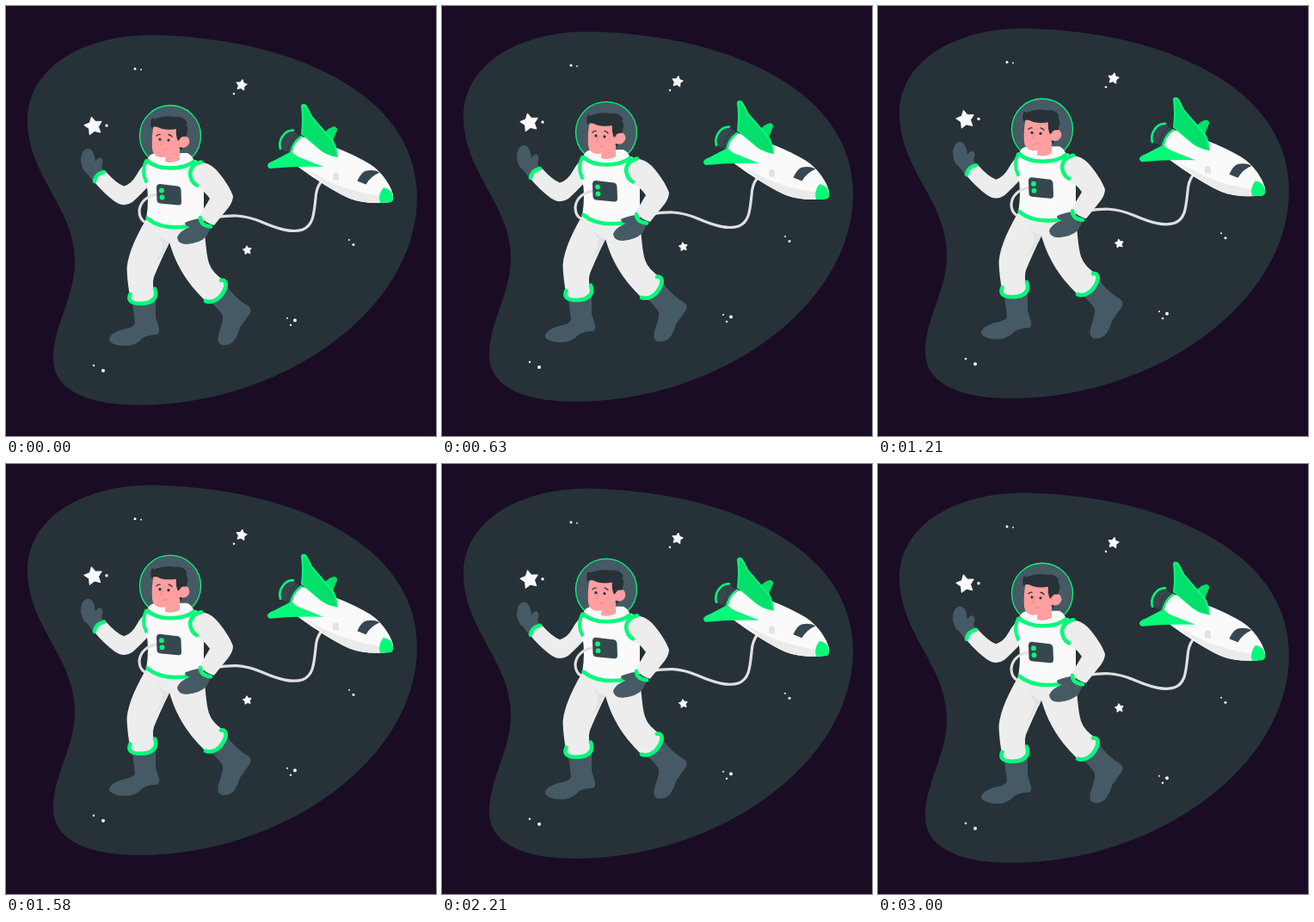
Animation, 500 px wide and 500 px high, one loop 3.04 s. Source, as an HTML page:

```html
<!DOCTYPE html>
<html lang="en">
<head>
<meta charset="utf-8">
<title>Floating astronaut</title>
<style>
html, body { margin: 0; width: 100%; height: 100%; overflow: hidden; background: #1a0c24; }
svg { display: block; width: 100%; height: 100%; }
.white { fill: #fafafa; }
.pale { fill: #ededed; }
.shade { fill: #e3e3e3; }
.slate { fill: #455a64; }
.dark { fill: #37474f; }
.green { fill: #07f97a; }
.leaf { fill: #04df6c; }
.skin { fill: #ff9fa0; }
.hair { fill: #263238; }
.ring { fill: none; stroke: #07f97a; stroke-width: 4.6; stroke-linecap: round; }
.hose { fill: none; stroke: #e0e0e0; stroke-width: 3.2; stroke-linecap: round; }
.line { fill: none; stroke: #263238; stroke-width: 1.3; stroke-linecap: round; }
</style>
</head>
<body>
<svg viewBox="0 0 500 500">
<g id="scene">
  <path class="hair" d="M180 34C90 31 25 72 25 133C25 197 80 235 80 296C80 340 55 370 55 410C55 448 98 464 155 464C320 464 478 354 478 222C478 100 330 39 180 34Z"/>
  <g id="sky" fill="#fafafa"></g>

  <!-- tether -->
  <path class="hose" d="M242 246C262 243 275 242 297 251C318 260 333 264 345 260C358 255 358 240 360 224C361 208 367 199 380 198"/>

  <!-- shuttle -->
  <path class="leaf" d="M370 148Q375 141 382 140Q387 142 384 147L378 162Z"/>
  <path class="dark" d="M333 144L343 152L333 172L319 166Q319 149 333 144Z"/>
  <path d="M339 148Q329 156 327 169" fill="none" stroke="#263238" stroke-width=".7"/>
  <path class="ring" style="stroke-width:2.6" d="M334 144.500C324 144 316 156 319 166"/>
  <path class="white" d="M344 152C365 157 398 169 420 182C435 190 447 207 450 219Q451 227 446 228C430 230 413 229 400 224C379 215 350 195 333 182Q330 161 344 152Z"/>
  <path fill="#ebebeb" d="M350 190C372 203 400 217 438 221L447 228C430 230 413 229 400 224C384 217 365 204 350 190Z"/>
  <path class="ring" style="stroke-width:2.6" d="M343 152Q332 160 331 173"/>
  <path class="green" d="M439 211Q449 213 450 222Q451 228 446 228.500L435 229Q432 219 439 211Z"/>
  <path class="dark" d="M408.500 203.500Q413 193 419 191.500Q428 190 434.500 193.500Q424 198 418.500 207.500Z"/>
  <path class="shade" d="M380 202V197Q380 193.500 383.500 193.500Q387 194 387 198V203Z"/>
  <path class="green" d="M343 116Q345 112 349 115Q352 119 356 128L381 157Q385 163 386 176Q371 174 361 164L343 149Q345 132 343 116Z"/>
  <path class="leaf" d="M345 115Q350 118 354 128L380 159L385 175Q371 173 361 163L344.500 148.500Q347 132 345 115Z"/>
  <path class="green" d="M304 185Q305 182 311 180L332 169Q337 175 344 177L369 187Q336 186 307 189Q304 188 304 185Z"/>

  <!-- boots and legs -->
  <path class="slate" d="M147 345L150 369Q149 374 136 376Q119 381 120 389Q125 396 143 395Q153 393 159 386Q166 382 176 382Q179 380 178 375L174 362V340Z"/>
  <path class="slate" d="M237 343Q249 354 252 360Q253 365 248 379Q244 391 250 394Q260 396 266 388Q270 382 272 374L284 357Q286 352 282 349Q266 340 254 322Z"/>
  <path class="pale" d="M189 256L190 275C197 298 207 319 233 344Q251 341 255 320Q240 311 236 299C232 286 232 266 229 247Z"/>
  <path class="pale" d="M164 246C154 263 142 286 140.500 305Q141 323 145 342Q163 351 174 335Q169 325 172 315Q179 298 190 275L202 257Z"/>
  <path class="shade" d="M176 265Q182 272 190 275Q186 286 171 302Q181 288 182 277Z"/>
  <path class="ring" d="M144.500 335Q140 345 154 346Q171 346.500 174 337Q174.500 332 173 329"/>
  <path class="ring" d="M232 343Q240 346 249 338Q258 327 255 321Q253 318 250 319"/>

  <!-- raised arm -->
  <path class="slate" d="M102 206Q96 195 91 192Q84 181 89 170Q93 164 99 167Q103 171 104 181Q107 175 111 177Q114 180 111 187Q112 190 116 194Z"/>
  <path class="pale" d="M166 180Q158 185 152 196Q146 207 137 209.500Q128 206 116 192.500Q106 196 103 205Q114 218 126 227Q137 235 147 228Q156 220 167 208Z"/>
  <path class="ring" d="M103 204Q104 195 114 193"/>

  <!-- torso -->
  <path class="white" d="M164 179Q190 185 221 179Q229 191 230 206L230 249Q215 263 193 260Q174 258 163 248Q167 224 163 205Z"/>
  <path class="hose" d="M177 219C164 220 156 228 155 238C155 246 158 249 161 251"/>
  <path class="ring" d="M164.500 247Q181 261 213 256"/>
  <path class="ring" style="stroke-width:4" d="M163 180Q157 192 163 204"/>
  <path class="dark" d="M179 207L200 209.500Q203 210 203.500 214L204 228Q204 232 200 231.500L179 229.500Q176 229 175.500 226L175 211Q175 207 179 207Z"/>
  <circle class="green" cx="181" cy="214.500" r="2.900"/>
  <circle class="green" cx="181.500" cy="222.500" r="2.900"/>

  <!-- lowered arm -->
  <path class="slate" d="M225 247Q214 249 208 252Q208 256 214 257Q202 261 199 269Q200 277 210 277Q225 276 233 268L238 258Z"/>
  <path class="pale" d="M221 182Q234 180 244 190C253 200 261 212 264 221Q264 227 259 234L242 255Q231 252 225 244L237 224Q231 215 220 209Q210 195 221 182Z"/>
  <path class="ring" d="M227 181.500Q215 184 214 195Q215 205 222 208.500"/>
  <path class="ring" d="M226 246Q226 255 238 256.500"/>

  <!-- helmet and head -->
  <circle class="slate" cx="191" cy="151" r="35.500"/>
  <path class="white" d="M165 177Q167 172 174 171L211 171Q217 174 218 179Q204 190 184 187Q170 185 165 177Z"/>
  <path class="skin" d="M186 170L185 181Q193 184 202 179V164Z"/>
  <path class="hair" d="M194 135H209L210 152L204 168L197 160Z"/>
  <path class="skin" d="M172 138Q169 150 170 166Q171 175 180 176Q195 176 202 164Q211 167 213.500 158Q213 150 205 151Q201 153 200 157Q197 151 198 141Z"/>
  <path class="hair" d="M169 142Q167 135 170 130Q172 133 174 131Q185 127 197 129Q204 128 209 133L211 136L209 137Q212 141 211 146L209 152Q203 151 201 157Q198 152 198 143Q184 145 177 141Q172 139 169 142Z"/>
  <circle class="hair" cx="179" cy="155" r="1.600"/>
  <circle class="hair" cx="189" cy="156" r="1.600"/>
  <path class="line" d="M175 151Q177 149 179 149.500M189 149.500Q192 150 193 152"/>
  <path d="M182 156L180 161.500L182 162M183 168Q185 166 187 167" fill="none" stroke="#ee7f86" stroke-width=".9" stroke-linecap="round"/>
  <circle cx="191" cy="151" r="35.500" fill="none" stroke="#07f97a" stroke-width="1.300"/>
  <path class="white" d="M165 177Q168 173 173 173Q177 181 187 182Q197 184 205 179L209 173Q216 174 218 179Q206 190 186 187Q171 185 165 177Z"/>
  <path class="ring" d="M164.500 180Q174 188.500 191 188.500Q209 188.500 218 181"/>
</g>
</svg>
<script>
const LOOP = 3040, RISE = 9.7;
const scene = document.getElementById('scene');

function starPath(x, y, r, tilt) {
  const points = Array.from({ length: 10 }, (_, i) => {
    const a = (i * 36 - 90 + tilt) * Math.PI / 180;
    const d = i % 2 ? r * 0.53 : r;
    return `${x + d * Math.cos(a)},${y + d * Math.sin(a)}`;
  });
  return `<polygon points="${points.join(' ')}" stroke="#fafafa" stroke-linejoin="round"/>`;
}

const stars = [[101.7, 139.7, 11, -12], [273.8, 92, 6.6, 10], [280.5, 284, 5.2, -8]];
const dots = [
  [117, 139, 1.7], [150, 73, 1.5], [157, 74, 0.9], [265, 102, 1.2],
  [399, 272, 1], [404, 277.5, 1.5], [336, 365.5, 2], [327, 363, 1],
  [331, 371, 1.2], [102, 418, 1.2], [113, 424, 2]
];
document.getElementById('sky').innerHTML =
  stars.map(s => starPath(...s)).join('') +
  dots.map(([x, y, r]) => `<circle cx="${x}" cy="${y}" r="${r}"/>`).join('');

// Steady drift up for half the loop, then back down.
function draw(now) {
  const phase = now % LOOP / LOOP;
  const lift = RISE * (1 - Math.abs(1 - 2 * phase));
  scene.setAttribute('transform', `translate(0 ${-lift})`);
  requestAnimationFrame(draw);
}
draw(performance.now());
</script>
</body>
</html>
```
